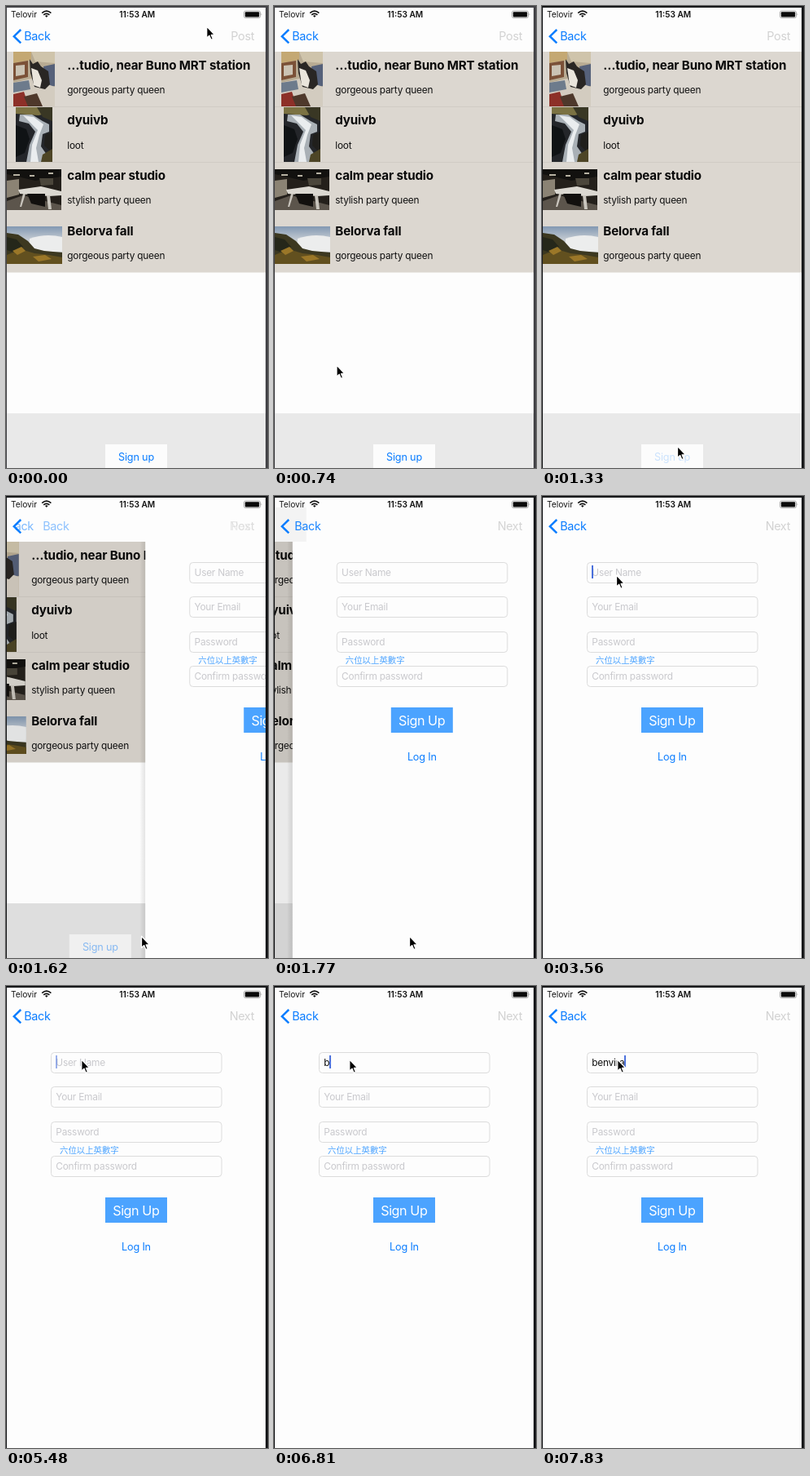
These frames come from a looping animation (322x566 px, 8000 ms). An HTML page:

```html
<!DOCTYPE html>
<html lang="en">
<head>
<meta charset="utf-8">
<title>Sign up flow</title>
<style>
  html, body { margin: 0; width: 100%; height: 100%; overflow: hidden; background: #18191b; }
  #stage { display: block; width: 100vw; height: 100vh; }
  text { font-family: Inter, Roboto, "Liberation Sans", sans-serif; white-space: pre; }
  .title { font-size: 15.2px; font-weight: 700; letter-spacing: -.17px; fill: #0a0a0a; }
  .body { font-size: 11.87px; letter-spacing: -.23px; fill: #111; }
  .hint { fill: #c9c9cd; }
  .nav { font-size: 14.4px; letter-spacing: -.35px; fill: #0b7dff; }
  .off { fill: #d2d2d2; text-anchor: end; }
  .link { font-size: 12.7px; letter-spacing: -.2px; fill: #0b7dff; text-anchor: middle; }
  .big { font-size: 16.2px; letter-spacing: -.45px; fill: #fff; text-anchor: middle; }
  .cjk { font-family: "Noto Sans CJK TC", "Noto Sans CJK", "Noto Sans CJK JP", sans-serif; font-size: 10.4px; fill: #4ba3ff; }
  .bar { font-size: 10.2px; fill: #111; }
</style>
</head>
<body>
<svg id="stage" viewBox="0 0 322 566" preserveAspectRatio="none">
  <defs>
    <clipPath id="screen"><rect x="1" y="2" width="318" height="564"/></clipPath>
    <clipPath id="label"><rect x="11" y="20" width="120" height="36"/></clipPath>
    <linearGradient id="edge"><stop stop-opacity=".02"/><stop offset="1" stop-opacity=".1"/></linearGradient>
    <linearGradient id="mist" x2="0" y2="1">
      <stop stop-color="#8298b2"/><stop offset=".45" stop-color="#d5d8da"/><stop offset="1" stop-color="#9a9a96"/>
    </linearGradient>
  </defs>
  <rect id="frame" width="322" height="566"/>
  <g clip-path="url(#screen)">
    <rect width="322" height="566" fill="#fdfdfd"/>

    <g id="list">
      <rect x="1" y="56" width="318" height="270.5" fill="#dcd7d0"/>
      <path d="M1 123.5H319M1 191.5H319" stroke="#d0cbc4"/>
      <svg x="9" y="56" width="51" height="67" viewBox="0 0 51 67">
        <rect width="51" height="67" fill="#b8ab93"/>
        <path d="M0 0H22V10L0 14Z" fill="#c4a873"/>
        <path d="M22 0H51V14L27 12Z" fill="#cfc4ab"/>
        <path d="M0 14L18 11V31L0 35Z" fill="#7b5138"/>
        <path d="M3 17L14 16V28L3 30Z" fill="#cbc3b4"/>
        <path d="M37 18L51 15V42L40 44Z" fill="#56617a"/>
        <path d="M0 38L22 33L51 43V67H0Z" fill="#d3ccc0"/>
        <path d="M0 38L19 35L21 46L0 50Z" fill="#6d7b8c"/>
        <path d="M0 52L13 49L19 67H0Z" fill="#8d3028"/>
        <path d="M13 55L29 51L36 67H18Z" fill="#4e382b"/>
        <path d="M20 9L24 15L30 12L34 18L43 24L45 40L39 46L26 43L21 26Z" fill="#292624"/>
        <path d="M22 20L30 23L35 35L33 44L25 41Z" fill="#eae5dc"/>
      </svg>
      <svg x="12" y="124" width="45" height="67" viewBox="0 0 45 67">
        <rect width="45" height="67" fill="#24262a"/>
        <path d="M0 0H45V6L28 10L0 8Z" fill="#7b7243"/>
        <path d="M26 0H45V17L33 12Z" fill="#393724"/>
        <path d="M5 9L20 9L33 17L41 21V30L33 33L31 48L38 58L35 67H13L17 46L24 30L16 20L4 17Z" fill="#a9b0b6"/>
        <path d="M9 10L22 12L34 21L29 34L25 50L28 67H18L20 46L27 28L18 19Z" fill="#eaedef"/>
        <path d="M0 22L13 27L17 39L11 56L0 61Z" fill="#101315"/>
        <path d="M36 34L45 30V56L35 47Z" fill="#201f1c"/>
        <path d="M33 58L45 51V67H31Z" fill="#4d4526"/>
      </svg>
      <svg x="1" y="200" width="67" height="50" viewBox="0 0 67 50">
        <rect width="67" height="50" fill="#24201b"/>
        <path d="M0 0H67V9L35 14L0 6Z" fill="#12110f"/>
        <path d="M0 14L15 12V31L0 35Z" fill="#8b8374"/>
        <path d="M0 39L20 32L67 44V50H0Z" fill="#5c554c"/>
        <path d="M14 25L42 21L67 27V32L52 33L16 30Z" fill="#dbd8d1"/>
        <path d="M20 30L23 30L18 46L16 46ZM49 32L53 32L55 49L51 49Z" fill="#c9c5bd"/>
        <path d="M25 30H47V46L30 42Z" fill="#12100e"/>
        <path d="M40 11H57V19L42 20Z" fill="#4b463b"/>
        <path d="M8 7H16M28 8H34M51 5H57" stroke="#eee8d4" stroke-width="1.4"/>
      </svg>
      <svg x="1" y="270" width="68" height="46" viewBox="0 0 68 46">
        <rect width="68" height="46" fill="url(#mist)"/>
        <path d="M28 15Q48 8 68 13V31H28Z" fill="#eceded"/>
        <path d="M0 8L14 10L26 18L34 27L46 30L68 32V46H0Z" fill="#3c3820"/>
        <path d="M0 13L12 16L20 25L9 32L0 29Z" fill="#25271a"/>
        <path d="M0 35L17 28L34 33L52 35L68 38V46H0Z" fill="#62501f"/>
        <path d="M7 30L18 25L23 30L13 35ZM32 37L47 35L55 40L39 43Z" fill="#9b7728"/>
      </svg>
      <g id="rows"></g>
      <rect x="1" y="499" width="318" height="67" fill="#e9e9e9"/>
      <rect x="122" y="537" width="76" height="29" fill="#fcfcfc"/>
      <text id="join" class="link" x="160" y="557">Sign up</text>
    </g>
    <path id="dim" d="M1 56H319V326.5H1ZM1 499H319V566H1Z"/>
    <rect id="dimGap" x="1" y="326.5" width="318" height="172.5"/>

    <g id="page">
      <rect x="-5" y="56" width="6" height="510" fill="url(#edge)"/>
      <rect x="1" y="56" width="318" height="510" fill="#fdfdfd"/>
      <g id="fields"></g>
      <text id="typed" class="body" x="61.3" y="98"></text>
      <text class="cjk" x="66" y="204.5">六位以上英數字</text>
      <rect x="122" y="259" width="76" height="31" fill="#4ba3ff"/>
      <text class="big" x="159.8" y="280.6">Sign Up</text>
      <text class="link" x="160" y="324">Log In</text>
      <rect id="caret" y="85" width="2" height="16" fill="#4a70dc"/>
    </g>

    <rect id="smear" x="1" y="14" height="42" fill="#f3f3f3"/>
    <path d="M18.2 29L9.8 37.2L18.2 45.4" fill="none" stroke="#0b7dff" stroke-width="2.5"/>
    <g clip-path="url(#label)"><text id="backA" class="nav" y="42.2">Back</text></g>
    <text id="backB" class="nav" y="42.2">Back</text>
    <text id="post" class="nav off" x="305" y="42.2">Post</text>
    <text id="next" class="nav off" x="305" y="42.2">Next</text>

    <text class="bar" x="6" y="13.8">Telovir</text>
    <g fill="none" stroke="#111" stroke-width="1.7">
      <path d="M44.2 8.6Q49.8 3.8 55.4 8.6M46.2 10.8Q49.8 7.8 53.4 10.8"/>
      <path d="M48 11.9L49.8 13.9L51.6 11.9Q49.8 10.8 48 11.9Z" fill="#111" stroke="none"/>
    </g>
    <text class="bar" x="161.3" y="13.8" font-weight="600" text-anchor="middle">11:53 AM</text>
    <rect x="292.5" y="6" width="20" height="8.6" rx="2" fill="none" stroke="#999" stroke-width=".8"/>
    <rect x="293.8" y="7.2" width="17.4" height="6.2" rx="1" fill="#0a0a0a"/>
    <path d="M313.6 8.7Q315.2 10.2 313.6 11.8Z" fill="#888"/>
  </g>
  <path id="mouse" d="M0 0V14.2L3.2 11.3L5.4 16.4L7.7 15.4L5.6 10.5H10Z" fill="#000" stroke="#fff" stroke-width="1.3" stroke-linejoin="round"/>
</svg>
<script>
const $ = id => document.getElementById(id);
const set = (id, attrs) => { for (const k in attrs) $(id).setAttribute(k, attrs[k]); };

const rows = [
  ["…tudio, near Buno MRT station", "gorgeous party queen"],
  ["dyuivb", "loot"],
  ["calm pear studio", "stylish party queen"],
  ["Belorva fall", "gorgeous party queen"]
];
$("rows").innerHTML = rows.map(([title, sub], i) => {
  const y = 56 + i * 67.8;
  return `<text class="title" x="75.3" y="${y + 21.5}">${title}</text>` +
         `<text class="body" x="75.3" y="${y + 50.7}">${sub}</text>`;
}).join("");

const fields = [["User Name", 81.5], ["Your Email", 123.5], ["Password", 166.5], ["Confirm password", 208.5]];
$("fields").innerHTML = fields.map(([hint, y], i) =>
  `<rect x="55.5" y="${y}" width="209.5" height="25" rx="4" fill="#fdfdfd" stroke="#dcdcdc"/>` +
  `<text id="hint${i}" class="body hint" x="61.3" y="${y + 16.4}">${hint}</text>`).join("");

// The screen refreshes only at these moments (ms).
const ticks = [0, 150, 300, 440, 590, 740, 880, 1030, 1330, 1620, 1770, 1920, 2070, 2220, 2370, 2520,
  2670, 2820, 2970, 3120, 3560, 3710, 3850, 4000, 4150, 4600, 5040, 5190, 5480, 5630, 6070, 6220,
  6510, 6810, 6950, 7100, 7390, 7540, 7680, 7830];
const LOOP = 8000, WIDTH = 318;
const word = "benvira", firstKey = ticks.indexOf(6810);

const mousePath = [[0, 246.7, 25], [300, 190, 130], [590, 96, 330], [740, 77, 440], [880, 110, 515],
  [1030, 166.5, 539.3], [1770, 166.5, 539.3], [1920, 160, 510], [2220, 110, 330], [2520, 83.5, 174],
  [2820, 87, 125], [3120, 91.5, 97], [3560, 91.5, 97], [4000, 92.8, 90]];
const blink = [[3550, 0], [3560, 1], [3850, 1], [4150, 0], [4450, 0], [4600, 1], [4900, 1], [5190, 0],
  [5300, 0], [5630, 1], [5920, 1], [6220, 0], [6350, 0], [6510, 1]];

function track(keys, t, col = 1) {
  const i = keys.findIndex(k => k[0] > t);
  if (i === 0) return keys[0][col];
  if (i < 0) return keys[keys.length - 1][col];
  const a = keys[i - 1], b = keys[i];
  return a[col] + (b[col] - a[col]) * (t - a[0]) / (b[0] - a[0]);
}

// Critically damped spring: distance the new page still has to travel.
function pushLeft(t) {
  const a = Math.max(0, t - 1535.7) * 0.0186;
  const d = WIDTH * (1 + a) * Math.exp(-a);
  return d < 0.6 ? 0 : d;
}

function draw(time) {
  const step = ticks.findLastIndex(k => k <= time);
  const t = ticks[step];
  const left = pushLeft(t), p = 1 - left / WIDTH;

  set("frame", { fill: t < 1330 ? "#444448" : "#18191b" });
  set("list", { transform: `translate(${-95 * p} 0)` });
  set("dim", { opacity: 0.1 * p });
  set("dimGap", { opacity: 0.1 * p ** 4 });
  set("join", { opacity: t < 1330 ? 1 : t < 1620 ? 0.2 : 0.45 });
  set("page", { transform: `translate(${left} 0)`, visibility: p > 0 ? "visible" : "hidden" });
  set("smear", { width: 17 + left, opacity: left > 10 && left < 60 ? 1 : 0 });

  set("backA", { x: 22.3 - 0.14 * (WIDTH - left), opacity: 1 - p });
  set("backB", { x: 22.3 + 0.135 * left, opacity: p });
  set("post", { opacity: 1 - p });
  set("next", { opacity: p });

  const typed = word.slice(0, Math.max(0, step - firstKey + 1));
  $("typed").textContent = typed;
  set("hint0", { opacity: typed ? 0 : 1 });
  const end = typed ? $("typed").getComputedTextLength() : 0;
  set("caret", { x: 61 + end, opacity: track(blink, t) });

  set("mouse", { transform: `translate(${track(mousePath, t)} ${track(mousePath, t, 2)})` });
}

const start = performance.now();
function loop() {
  draw((performance.now() - start) % LOOP);
  requestAnimationFrame(loop);
}
loop();
</script>
</body>
</html>
```
